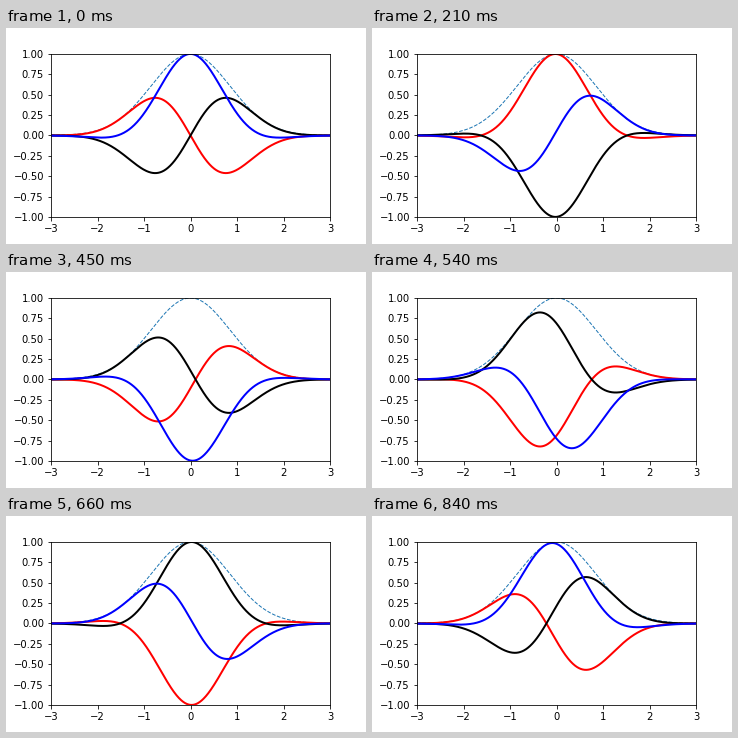
Animation of 360 by 216 pixels, one loop 870 ms. Source, as a matplotlib script:

```python
import numpy as np
import matplotlib.pyplot as plt
from matplotlib.animation import FuncAnimation

FRAMES = 29
INTERVAL = 30  # ms

plt.rcParams["font.family"] = "DejaVu Sans"
plt.rcParams["font.size"] = 10

x = np.linspace(-3, 3, 601)
envelope = np.exp(-np.log(2) * x**2)  # full width at half maximum is 2

fig = plt.figure(figsize=(5, 3), dpi=72, facecolor="white")
fig.subplots_adjust(left=0.125, right=0.9, bottom=0.125, top=0.88)
ax = fig.add_subplot()
ax.set_xlim(-3, 3)
ax.set_ylim(-1, 1)
ax.set_xticks(np.arange(-3, 4))
ax.set_yticks(np.linspace(-1, 1, 9))

ax.plot(x, envelope, "--", color="#1f77b4", lw=1)
red, = ax.plot([], [], color="red", lw=2)
black, = ax.plot([], [], color="black", lw=2)
blue, = ax.plot([], [], color="blue", lw=2)


def update(i):
    phase = x - 2 * np.pi * i / FRAMES
    red.set_data(x, -envelope * np.sin(phase))
    black.set_data(x, envelope * np.sin(phase))
    blue.set_data(x, envelope * np.cos(phase))
    return red, black, blue


anim = FuncAnimation(fig, update, frames=FRAMES, interval=INTERVAL,
                     repeat=True, repeat_delay=0)
plt.show()
```
